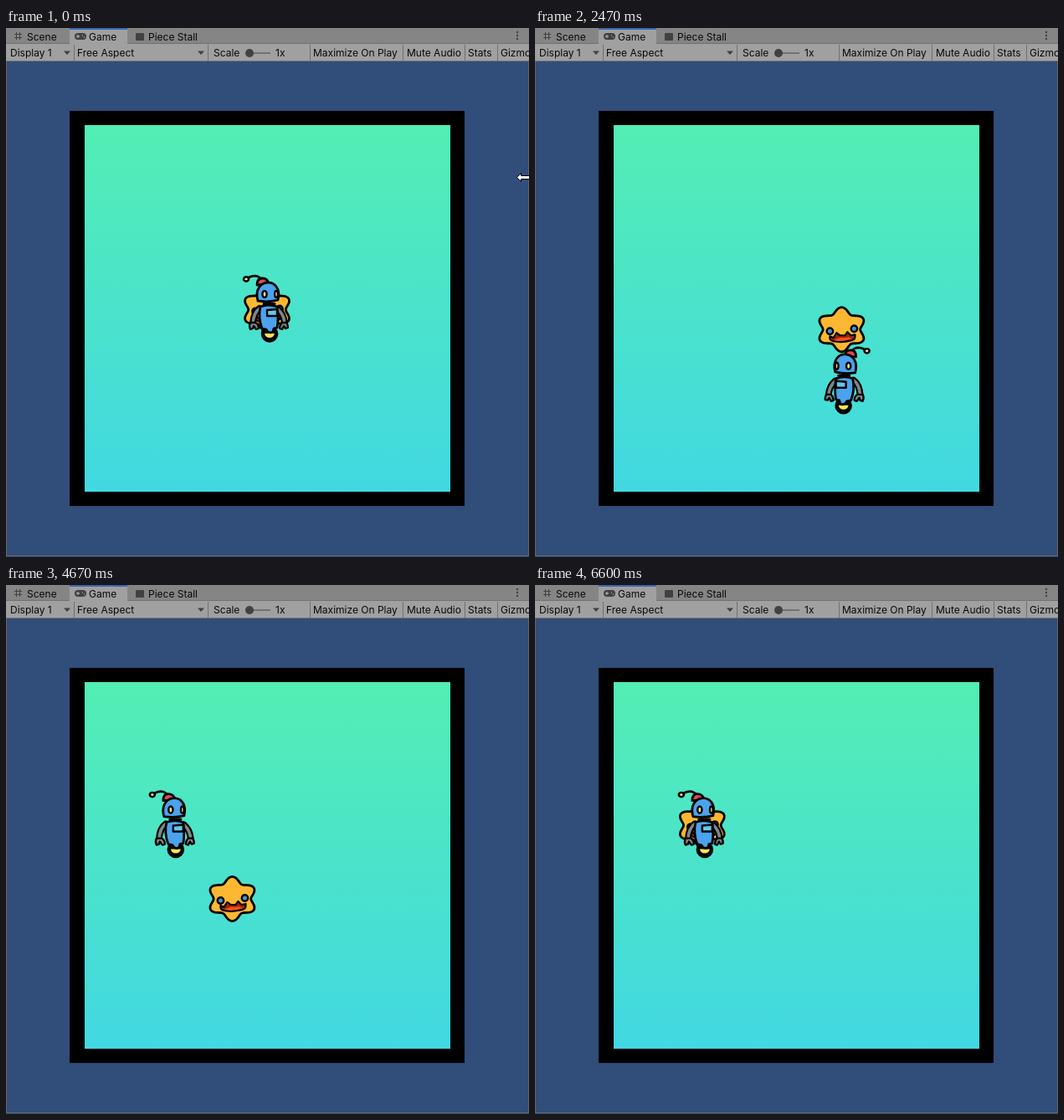
These frames come from a looping animation (625 px wide and 632 px high, 7.39 s). An HTML page:

```html
<!DOCTYPE html>
<html lang="en">
<head>
<meta charset="utf-8">
<title>Robot chase</title>
<style>
  html, body { margin: 0; width: 100%; height: 100%; overflow: hidden; background: #314d79; }
  svg { display: block; width: 625px; height: 632px; }
  text { font: 12px Inter, sans-serif; fill: #080808; }
  .ink { stroke: #000; stroke-width: 2.8; stroke-linejoin: round; stroke-linecap: round; }
  .icon { fill: #414141; }
</style>
</head>
<body>
<svg viewBox="0 0 625 632">
  <defs>
    <linearGradient id="sky" x2="0" y2="1">
      <stop offset="0" stop-color="#53eeb4"/>
      <stop offset="1" stop-color="#42d8e2"/>
    </linearGradient>
  </defs>

  <!-- Game view -->
  <rect width="625" height="632" fill="#314d79"/>
  <rect x="76" y="99" width="472" height="472"/>
  <rect x="94" y="116" width="437" height="438" fill="url(#sky)"/>
  <path d="M.5 40V630.5H624.5V40" fill="none" stroke="#666"/>

  <!-- Tabs and toolbar -->
  <rect width="625" height="19" fill="#858585"/>
  <rect y="19" width="625" height="21" fill="#a0a0a0"/>
  <rect x="76" width="69" height="20" fill="#a0a0a0"/>
  <rect x="76" width="69" height="2" fill="#3469ad"/>
  <path d="M0 18.5H76M145 18.5H625M0 39.5H625M81.5 20V39M241.5 20V39M363.5 20V39M474.5 20V39M548.5 20V39M587.5 20V39"
        fill="none" stroke="#717171"/>
  <path d="M12.5 5V14M16.5 5V14M10 7.5H19M10 11.5H19" stroke="#414141" fill="none"/>
  <rect class="icon" x="82" y="6" width="14" height="8" rx="4"/>
  <path d="M84 10H88M86 8V12M91 9H92M93 11H94" stroke="#a0a0a0" stroke-width="1.3"/>
  <rect class="icon" x="155" y="6" width="10" height="9" rx="1"/>
  <g class="icon">
    <path d="M69 27.5H77L73 32ZM229 27.5H237L233 32Z"/>
    <path d="M291 29.2H316V30.8H291Z" fill="#666"/>
    <circle cx="291" cy="30" r="5"/>
    <circle cx="611" cy="5" r="1.2"/><circle cx="611" cy="9" r="1.2"/><circle cx="611" cy="13" r="1.2"/>
  </g>
  <text x="25" y="15">Scene</text>
  <text x="99" y="15">Game</text>
  <text x="170" y="15">Piece Stall</text>
  <text x="5" y="34">Display 1</text>
  <text x="85" y="34">Free Aspect</text>
  <text x="248" y="34">Scale</text>
  <text x="322" y="34">1x</text>
  <text x="367" y="34">Maximize On Play</text>
  <text x="479" y="34">Mute Audio</text>
  <text x="552" y="34">Stats</text>
  <text x="591" y="34">Gizmos</text>

  <g id="flower" class="ink">
    <path id="petals" fill="#fdb833"/>
    <path fill="#a32208" stroke-width="2.2" d="M-14 8L-10 10L-6 4L-2 7L4 7L7 3L11 7L16 6Q17 12 12 13Q0 16-10 14Q-15 13-14 8Z"/>
    <path fill="#f4511e" stroke="none" d="M-9 13Q-2 8 3 10Q9 8 12 11Q2 15-9 13Z"/>
    <circle cx="-14" cy="2" r="3.7" fill="#4494dc" stroke-width="2.4"/>
    <circle cx="15" cy="-1" r="3.7" fill="#4494dc" stroke-width="2.4"/>
  </g>

  <g id="robot" class="ink">
    <path fill="none" d="M-22-40Q-12-45-6-37"/>
    <ellipse cx="-25" cy="-38" rx="3" ry="2.6" fill="#f7eec0" stroke-width="2.6"/>
    <path fill="#df4a50" d="M-12-31Q-12-39-6-39Q1-39 2-32Z"/>
    <circle cx="3" cy="27.5" r="9.3" stroke-width="2"/>
    <path fill="#f8e94c" stroke="none" d="M-3 27H9Q8 32 3 32Q-2 32-3 27Z"/>
    <path fill="none" stroke-width="8" d="M-9-3Q-16 2-17 15M13-2Q20 4 21 15"/>
    <path fill="none" stroke="#7e878a" stroke-width="3.6" d="M-9-3Q-16 2-17 15M13-2Q20 4 21 15"/>
    <path fill="#7e878a" stroke-width="2.3" d="M-20 14Q-22 18-20 22L-17 21L-16 18L-13 22L-10 21Q-10 16-14 14ZM18 14Q15 17 15 21L18 22L20 18L22 21L25 20Q25 16 23 14Z"/>
    <path fill="#4ca2ec" d="M-8-5Q2-9 12-5Q14 8 12 20L8 21L7 25L4 26L1 25L-1 22L-6 21Q-11 8-8-5Z"/>
    <path fill="#67c8ea" stroke-width="2.4" d="M0-1L12-2V6L0 6Z"/>
    <path fill="none" stroke-width="3" d="M-4-8.5H9"/>
    <path fill="#4ca2ec" d="M-11-12C-19-40 20-42 13-13Q1-10-11-12Z"/>
    <ellipse cx="-3" cy="-20" rx="2.6" ry="4" fill="#f6e596" stroke-width="2.4"/>
    <ellipse cx="11" cy="-20" rx="1.9" ry="4" fill="#f6e596" stroke-width="2.4"/>
  </g>

  <path id="cursor" d="M0 0L5-5V-2H18V-5L23 0L18 5V2H5V5Z" fill="#fff" stroke="#000"/>
</svg>

<script>
const LOOP = 7.39, FPS = 15;
const HOME = { x: 312, y: 338 };
const ROBOT_SPEED = 156, FLOWER_SPEED = 59, CHASE_START = 1.35;

// Keys the player holds, times in seconds
const holds = [
  { dx: 1, dy: 0, from: 1.267, to: 1.933 },
  { dx: 0, dy: 1, from: 1.8, to: 2.35 },
  { dx: -1, dy: 0, from: 2.183, to: 2.767 },
  { dx: -1, dy: 0, from: 3.123, to: 4.017 },
  { dx: 0, dy: -1, from: 3.54, to: 4.017 },
  { dx: 0, dy: -1, from: 4.093, to: 4.483 },
  { dx: 1, dy: 0, from: 4.307, to: 4.4 }
];

function robotAt(time) {
  const robot = { ...HOME, flip: 1 };
  for (const { dx, dy, from, to } of holds) {
    if (time <= from) continue;
    const distance = ROBOT_SPEED * (Math.min(time, to) - from);
    robot.x += dx * distance;
    robot.y += dy * distance;
    robot.flip = dx || robot.flip;
  }
  return robot;
}

// The flower heads straight for the robot at a constant speed
function flowerAt(time) {
  const dt = 1 / 60, step = FLOWER_SPEED * dt;
  let x = HOME.x, y = HOME.y - 1.5;
  for (let t = CHASE_START; t <= time; t += dt) {
    const robot = robotAt(t);
    const dx = robot.x - x, dy = robot.y - 1.5 - y;
    const k = Math.min(1, step / (Math.hypot(dx, dy) || 1));
    x += dx * k;
    y += dy * k;
  }
  return { x, y };
}

function petalOutline() {
  const points = [];
  for (let i = 0; i < 120; i++) {
    const angle = i * Math.PI / 60;
    const radius = 23.2 + 3.3 * Math.cos(6 * angle);
    points.push(`${1.12 * radius * Math.sin(angle)} ${-radius * Math.cos(angle)}`);
  }
  return `M${points.join('L')}Z`;
}

const [flower, robot, cursor, petals] =
  ['flower', 'robot', 'cursor', 'petals'].map(id => document.getElementById(id));
petals.setAttribute('d', petalOutline());

function place(node, { x, y, flip = 1 }) {
  node.setAttribute('transform', `translate(${x} ${y}) scale(${flip} 1)`);
}

const start = performance.now();
function draw() {
  const elapsed = (performance.now() - start) / 1000 % LOOP;
  const time = Math.floor((elapsed + 0.005) * FPS) / FPS;
  place(flower, flowerAt(time));
  place(robot, robotAt(time));
  place(cursor, { x: 610.5 + 45 * time, y: 178.5 - 190 * time });
  cursor.style.display = time < 0.25 ? '' : 'none';
  requestAnimationFrame(draw);
}
draw();
</script>
</body>
</html>
```
